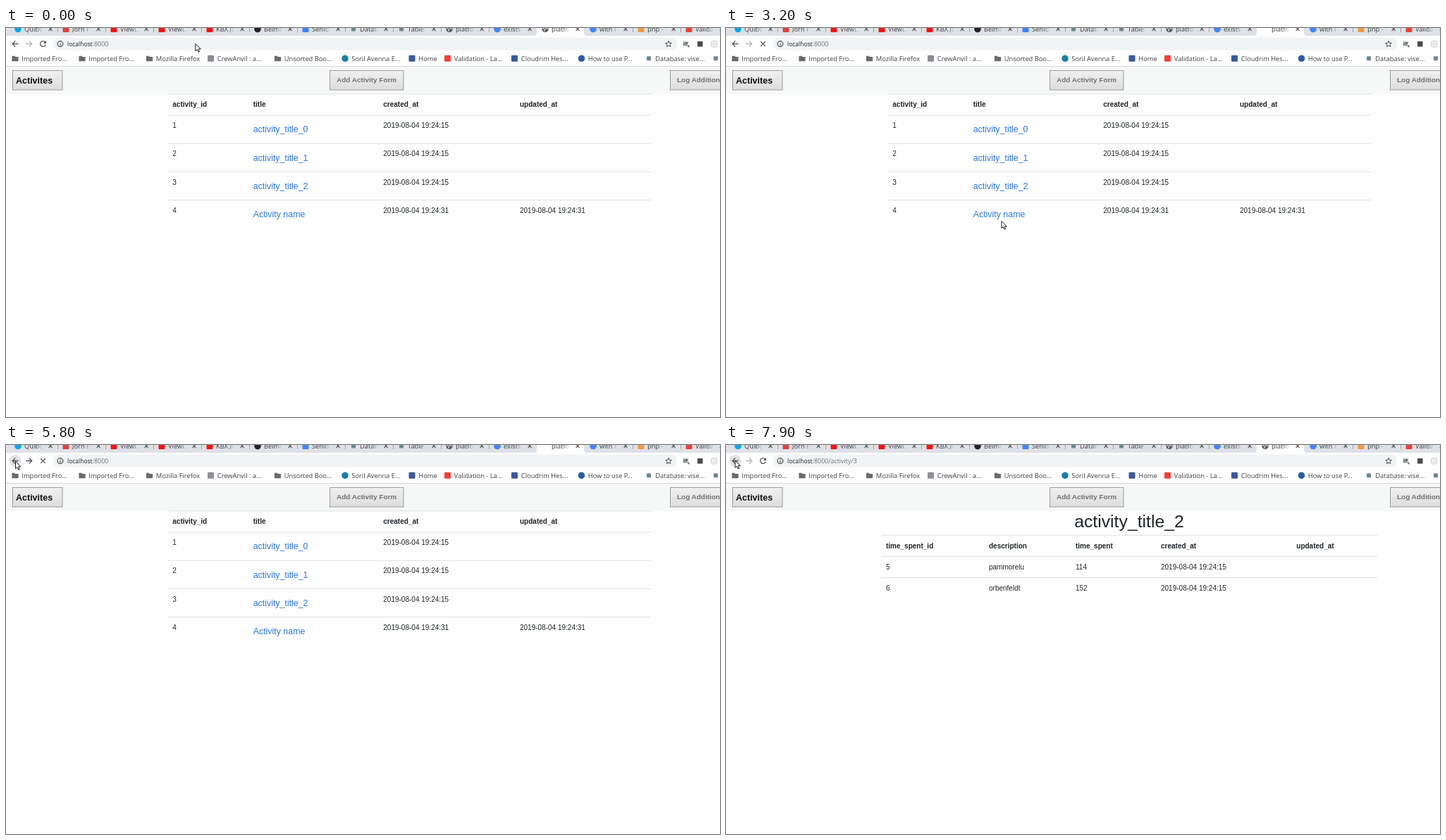
Write an HTML page that moves like this. It is 1013 px wide and 553 px high and loops after 8000 ms.

```html
<!DOCTYPE html>
<html lang="en">
<head>
<meta charset="utf-8">
<title>Activities</title>
<style>
  html, body { margin: 0; width: 100%; height: 100%; overflow: hidden; background: #fdfefd; }
  svg { display: block; }
  text { white-space: pre; }
  .ui { font: 9.3px "Open Sans", "Noto Sans", sans-serif; fill: #3c4043; }
  .pg { font: 10px "Liberation Sans", Arial, sans-serif; fill: #212529; }
  .b { font-weight: bold; }
  .link { font-size: 12.4px; fill: #2f77cf; }
  .link.hover { fill: #1b4f91; }
  .line { stroke: #dee2e6; stroke-width: 1; }
  .icon { fill: none; stroke: #505357; stroke-width: 1.3; }
</style>
</head>
<body>
<svg id="stage" width="1013" height="553" viewBox="0 0 1013 553">
  <defs>
    <linearGradient id="btn" x2="0" y2="1">
      <stop offset="0" stop-color="#f0f0f0"/><stop offset="1" stop-color="#dddddd"/>
    </linearGradient>
    <linearGradient id="fade">
      <stop offset="0" stop-color="#dee1e6" stop-opacity="0"/><stop offset="1" stop-color="#dee1e6"/>
    </linearGradient>
    <linearGradient id="fadeOn">
      <stop offset="0" stop-color="#fff" stop-opacity="0"/><stop offset="1" stop-color="#fff"/>
    </linearGradient>
  </defs>
  <rect width="1013" height="553" fill="#fdfefd"/>
  <g id="tabs"></g>
  <rect y="11" width="1013" height="43" fill="#fefefe"/>
  <g id="toolbar">
    <circle id="backHover" cx="13" cy="22.5" r="8.5" fill="#dfe1e4"/>
    <path class="icon" d="M17.5 22.5H9.2M13.2 18.4L9.1 22.5L13.2 26.6"/>
    <path id="forward" class="icon" d="M28.3 22.5H36.6M32.6 18.4L36.7 22.5L32.6 26.6"/>
    <g id="reload">
      <path class="icon" d="M55.6 20A3.9 3.9 0 1 0 56.3 23.5"/>
      <path d="M57 17.9V22H52.9Z" fill="#505357"/>
    </g>
    <path id="stop" class="icon" d="M49.2 19.2L55.9 25.9M55.9 19.2L49.2 25.9"/>
    <rect id="pill" x="66.5" y="13.5" width="886" height="18" rx="9" fill="#f1f3f4"/>
    <circle cx="77" cy="22.6" r="3.9" class="icon" stroke-width="1"/>
    <path d="M77 22V25M77 20V21.1" stroke="#505357" stroke-width="1.1"/>
    <rect id="selection" x="87" y="17" width="58" height="12" fill="#b9d5fb"/>
    <text class="ui" x="87" y="26" style="font-size:8.5px"><tspan fill="#202124">localhost</tspan><tspan id="path" style="font-size:8.9px" fill="#6b6f74"></tspan></text>
    <path class="icon" style="stroke-width:1" d="M940 18.3L941.2 21.3L944.4 21.5L941.9 23.6L942.7 26.7L940 25L937.3 26.7L938.1 23.6L935.6 21.5L938.8 21.3Z"/>
    <rect x="960.5" y="18.5" width="8" height="7.5" rx="1" fill="#cfd1d3"/>
    <text class="ui b" x="961" y="25" style="font-size:6.5px">IP</text>
    <path d="M967 24.5L969.6 27.3" class="icon"/>
    <rect x="981" y="19" width="7.5" height="7.5" fill="#4a4a4a"/>
    <rect x="1000.5" y="18.5" width="8" height="8.5" rx="1.5" fill="#ececec" stroke="#d6d6d6"/>
  </g>
  <g id="marks"></g>
  <rect y="55" width="1013" height="38.5" fill="#f6f8f7"/>
  <path d="M0 54.5H1013" stroke="#d3d5d6"/>
  <g id="nav"></g>
  <g id="page"></g>
  <path id="arrow" d="M0 0V10.4L2.4 8.2L4.1 12L5.8 11.2L4.1 7.6H7.4Z" fill="#fff" stroke="#1a1a1a" stroke-width="1" stroke-linejoin="round"/>
  <path id="beam" d="M267.8 18.6H269.4L270 19.2L270.6 18.6H272.2M270 19V27.2M267.8 27.6H269.4L270 27L270.6 27.6H272.2" fill="none" stroke="#222" stroke-width="1.2"/>
</svg>
<script>
const $ = id => document.getElementById(id);
const text = (x, y, s, cls, extra = '') => `<text x="${x}" y="${y}" class="${cls}" ${extra}>${s}</text>`;
const hline = (x1, x2, y) => `<path class="line" d="M${x1} ${y}H${x2}"/>`;

const dot = (x, y, c, r = 4.8) => `<circle cx="${x}" cy="${y}" r="${r}" fill="${c}"/>`;
const box = (x, y, c, s = 9) => `<rect x="${x - s / 2}" y="${y - s / 2}" width="${s}" height="${s}" rx="1" fill="${c}"/>`;
const folder = (x, y) => `<path d="M${x - 4.6} ${y - 3.6}H${x - 0.8}L${x + 0.4} ${y - 2.4}H${x + 4.6}V${y + 4}H${x - 4.6}Z" fill="#6a6a6a"/>`;
const globe = (x, y) => dot(x, y, '#55585c', 4.6) +
  `<path d="M${x - 3.4} ${y - 1}L${x - 0.5} ${y + 0.5}L${x - 1} ${y + 3.4}M${x + 0.5} ${y - 3}L${x + 1} ${y - 1}L${x + 3.6} ${y}" fill="none" stroke="#e6e6e6" stroke-width="1.2"/>`;

const ACTIVE = 11, PITCH = 68;
const tabs = [
  ['Quibo', dot, '#0fa8e6'], ['Jorn F', box, '#d9453a'], ['ViewLo', box, '#f01414'],
  ['ViewLo', box, '#f01414'], ['KBX Ju', box, '#f01414'], ['Belmo', dot, '#222'],
  ['Senior', box, '#4285f4'], ['Datab', box, '#6d8792', 6], ['Table:', box, '#6d8792', 6],
  ['platfor', globe], ['exists:', dot, '#4285f4'], ['platfor', globe],
  ['with i', dot, '#4285f4'], ['php - L', box, '#ef9a4a'], ['Valida', box, '#ee4238']
];
$('tabs').innerHTML = '<rect width="1013" height="11" fill="#dee1e6"/>' + tabs.map(([name, icon, color, size], i) => {
  const x = i * PITCH, on = i === ACTIVE;
  let s = on ? `<path d="M${x + 1} 11Q${x + 5} 11 ${x + 5} 6V0H${x + 72}V6Q${x + 72} 11 ${x + 76} 11Z" fill="#fff"/>` : '';
  s += `<g${on ? ' id="favicon"' : ''}>${icon(x + 17, 1.5, color, size)}</g>`;
  s += text(x + 26, 5, name, 'ui');
  s += `<rect x="${x + 43}" width="9" height="10" fill="url(#${on ? 'fadeOn' : 'fade'})"/>`;
  s += `<rect x="${x + 52}" width="14" height="9" fill="${on ? '#fff' : '#dee1e6'}"/>`;
  s += `<path class="icon" style="stroke-width:1.1" d="M${x + 60.6} -1L${x + 65.6} 4M${x + 65.6} -1L${x + 60.6} 4"/>`;
  if (!on && i !== ACTIVE - 1) s += `<path d="M${x + 73.5} 0V6" stroke="#9ea1a6"/>`;
  return s;
}).join('');

const marks = [
  [13, 'Imported Fro...', folder], [108, 'Imported Fro...', folder], [203.5, 'Mozilla Firefox', folder],
  [290.5, 'CrewAnvil : a...', box, '#8d8d92'], [385.5, 'Unsorted Boo...', folder],
  [481, 'Soril Avenna E...', dot, '#1c7fa8'], [576, 'Home', box, '#3b5998'],
  [626.5, 'Validation - La...', box, '#ee4238'], [721.5, 'Cloudrim Hes...', box, '#3b5998'],
  [816.5, 'How to use P...', dot, '#2c5d9f'], [912, 'Database: vise...', box, '#6d8792', 6],
  [1007, '', box, '#6d8792', 6]
];
$('marks').innerHTML = marks.map(([x, name, icon, color, size]) =>
  icon(x, 43.3, color, size) + text(x + 9.3, 46.6, name, 'ui')).join('');

const button = (x, w, tx, ty, s, size, color) =>
  `<rect x="${x}" y="60.5" width="${w}" height="27.5" fill="url(#btn)" stroke="#9c9c9c"/>` +
  text(tx, ty, s, 'pg b', `style="font-size:${size}px;fill:${color}"`);
$('nav').innerHTML =
  button(9.5, 70.5, 14, 78.6, 'Activites', 12.5, '#111') +
  button(459.5, 104.5, 469, 77.3, 'Add Activity Form', 9.95, '#717171') +
  button(942.5, 90, 952, 77.3, 'Log Addition', 9.95, '#717171');

const cells = (xs, y, row, cls) => row.map((s, i) => s ? text(xs[i], y, s, cls) : '').join('');
const titles = ['activity_title_0', 'activity_title_1', 'activity_title_2', 'Activity name'];
const linkY = i => 148.4 + i * 40.2;

function listPage(hover) {
  const xs = [236.3, 350.7, 535.3, 729];
  let s = hline(229, 915, 93.8) + cells(xs, 111.8, ['activity_id', 'title', 'created_at', 'updated_at'], 'pg b');
  titles.forEach((name, i) => {
    const last = i === 3, date = '2019-08-04 19:24:' + (last ? 31 : 15);
    s += hline(229, 915, 124 + i * 40.2);
    s += cells(xs, 142.3 + i * 40.1, [String(i + 1), '', date, last ? date : ''], 'pg');
    s += text(xs[1], linkY(i), name, 'pg link' + (i === hover ? ' hover' : ''));
  });
  return s;
}

function detailPage(title, xs, rows) {
  const head = ['time_spent_id', 'description', 'time_spent', 'created_at', 'updated_at'];
  return text(572, 116.7, title, 'pg', 'text-anchor="middle" style="font-size:24.8px"') +
    hline(220, 924, 128.3) + cells(xs, 146.6, head, 'pg b') +
    rows.map((r, i) => hline(220, 924, 158.4 + i * 30.2) + cells(xs, 176.9 + i * 30.2, r, 'pg')).join('');
}

const stamp = '2019-08-04 19:24:43', early = '2019-08-04 19:24:15';
const views = {
  4: detailPage('Activity name', [227, 348.7, 511.3, 611.5, 771.5],
    [['7', 'Description of activity', '60', stamp, stamp]]),
  3: detailPage('activity_title_2', [227, 373, 496, 617, 809.3],
    [['5', 'pammorelu', '114', early], ['6', 'orbenfeldt', '152', early]])
};

// pointer tip: time, x, y
const moves = [
  [0, 268.8, 22.3], [1600, 270, 23], [1700, 290, 34], [1900, 425, 84], [2000, 453, 92.5],
  [2100, 453, 92.5], [2200, 446, 97], [2400, 412, 122], [2600, 389.5, 145], [2900, 396, 266],
  [3100, 396, 267], [3300, 386, 282], [3500, 366, 240], [3900, 340.8, 173.7], [4000, 340.8, 173.7],
  [4200, 510, 176], [4300, 579, 160], [4400, 530, 134], [4600, 383, 104.5], [4700, 383, 104.5],
  [4900, 104, 69.5], [5000, 104, 69.5], [5200, 48, 40], [5400, 15, 23], [5500, 12, 21.3],
  [5900, 14, 24], [6000, 60, 52], [6200, 330, 190], [6300, 383, 222], [6800, 383, 222],
  [7100, 290, 132], [7400, 144, 36], [7500, 110, 32], [7700, 38, 25], [7900, 13, 22]
];

function tip(t) {
  const i = moves.findIndex(m => m[0] > t);
  if (i < 0) return moves[moves.length - 1].slice(1);
  const [t0, x0, y0] = moves[i - 1], [t1, x1, y1] = moves[i], k = (t - t0) / (t1 - t0);
  return [x0 + (x1 - x0) * k, y0 + (y1 - y0) * k];
}

const show = (id, on) => $(id).setAttribute('display', on ? 'inline' : 'none');
const within = (t, a, b) => t >= a && t < b;
let shown = '', last = -1;

function draw(ms) {
  const t = Math.floor(ms / 100) * 100;
  if (t === last) return;
  last = t;
  const view = within(t, 3400, 5700) ? 4 : t >= 6800 ? 3 : 0;
  const loading = [[1100, 1200], [3100, 3500], [5600, 5900], [6600, 7000]].some(([a, b]) => within(t, a, b));
  const focus = within(t, 400, 1100), beam = within(t, 100, 1700);
  const [x, y] = tip(t);

  const hover = view || x < 351 || x > 429 ? -1 : titles.findIndex((_, i) => Math.abs(y - linkY(i) + 4) < 9);
  const key = view + ':' + hover;
  if (key !== shown) {
    $('page').innerHTML = view ? views[view] : listPage(hover);
    shown = key;
  }

  $('path').textContent = ':8000' + (view ? '/activity/' + view : '');
  show('stop', loading);
  show('reload', !loading);
  show('favicon', !loading);
  show('selection', focus);
  $('pill').setAttribute('fill', focus ? '#fff' : '#f1f3f4');
  $('pill').setAttribute('stroke', focus ? '#6ea3ee' : 'none');
  $('forward').style.stroke = within(t, 5700, 6800) ? '#505357' : '#b4b6b9';
  show('backHover', Math.hypot(x - 13, y - 22.5) < 8.5);
  show('beam', beam);
  show('arrow', !beam);
  $('arrow').setAttribute('transform', `translate(${x} ${y})`);
}

const start = performance.now();
function tick() {
  draw((performance.now() - start) % 8000);
  requestAnimationFrame(tick);
}
tick();
</script>
</body>
</html>
```
